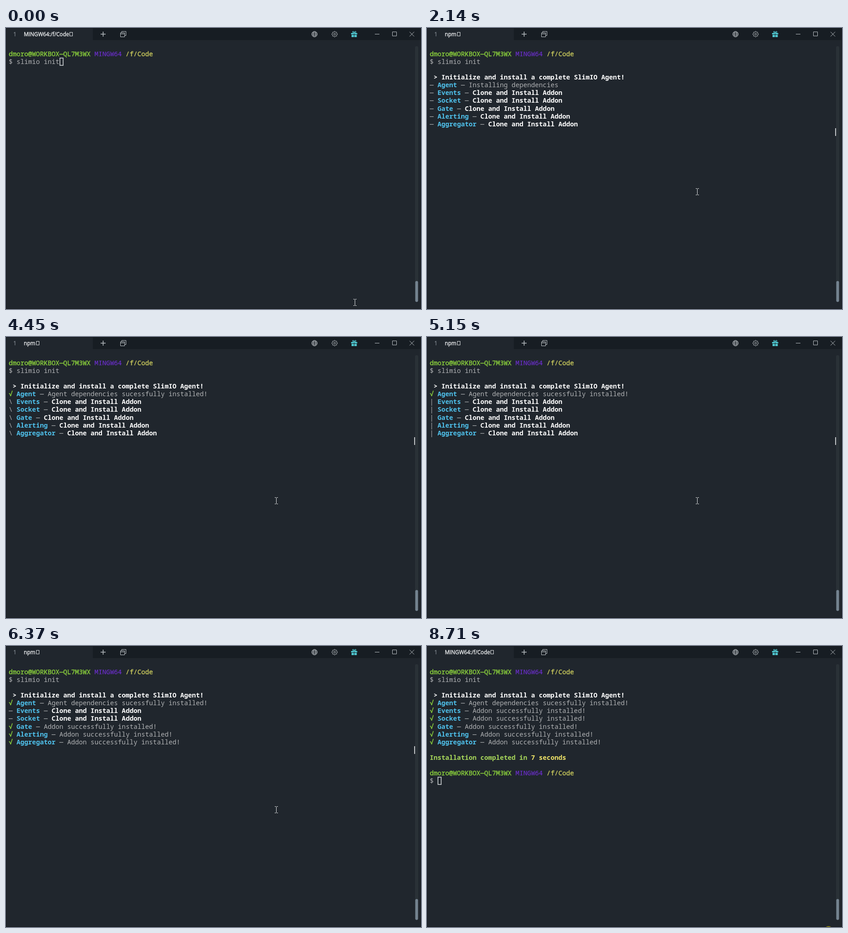
An HTML page for the animation above (8.86 s loop, 908 px wide and 617 px high).

```html
<!DOCTYPE html>
<html lang="en">
<head>
<meta charset="utf-8">
<title>Terminal</title>
<style>
  html, body { margin: 0; width: 100%; height: 100%; overflow: hidden; background: #20262d; }
  svg { display: block; width: 908px; height: 617px; }
  text { white-space: pre; }
  .ui { font: 11.7px "Open Sans", "Noto Sans", sans-serif; fill: #f2f4f5; stroke: #f2f4f5; stroke-width: .35; }
  .ui.index { fill: #7d858c; stroke: #7d858c; }
  #rows { font: 14.22px "Noto Sans Mono", "DejaVu Sans Mono", monospace; }
  .grey { fill: #b0b2b4; }
  .user { fill: #8bd13c; stroke: #8bd13c; stroke-width: .4; }
  .sys { fill: #6b2fcb; stroke: #6b2fcb; stroke-width: .2; }
  .path { fill: #c8c85c; stroke: #c8c85c; stroke-width: .4; }
  .white { fill: #fff; font-weight: 700; }
  .name { fill: #4fc1ec; font-weight: 700; }
  .ok { fill: #8bd13c; font-weight: 700; }
  .lime { fill: #a8d85a; font-weight: 700; }
  .gold { fill: #f0e468; font-weight: 700; }
  .icon { fill: none; stroke: #bcc1c5; stroke-width: 1; }
</style>
</head>
<body>
<svg viewBox="0 0 908 617">
  <rect width="908" height="617" fill="#20262d"/>
  <rect x="190" width="718" height="26.5" fill="#171d23"/>
  <rect x=".5" y=".5" width="907" height="616" fill="none" stroke="#12161a"/>

  <text class="ui index" x="16" y="18">1</text>
  <text class="ui" id="title" x="39" y="18"></text>
  <rect id="tofu" y="9.5" width="6" height="8" fill="none" stroke="#dfe2e4"/>

  <g class="icon">
    <path d="M207 13.5h11M212.5 8v11" stroke-width="1.5"/>
    <path d="M250.5 10.5h9v9h-9zM250.5 13h9M253 10.5v-3h9.5v9h-3"/>
    <circle cx="675" cy="13.5" r="6"/>
    <ellipse cx="675" cy="13.5" rx="2.8" ry="6"/>
    <path d="M669 13.5h12M670 10.5h10M670 16.5h10"/>
    <circle cx="719" cy="13.5" r="2"/>
    <path id="gear"/>
    <path d="M807 13.5h10M845.5 8.5h9v9h-9zM883 8.5l10 10M893 8.5l-10 10"/>
  </g>
  <g fill="#4fc6cf">
    <path d="M755 11h6.3v3h-6.3zM762.2 11h6.3v3h-6.3zM756 15h5.3v5h-5.3zM762.2 15h5.3v5h-5.3z"/>
    <path d="M762 11c-5-.5-4-4-2-3.500q1.500.5 2 3.500c.5-3 1-3.500 2-3.500 2-.5 3 3-2 3.500z" fill="none" stroke="#4fc6cf" stroke-width="1.2"/>
  </g>

  <rect x="895" y="40" width="7" height="561" rx="3" fill="#2a3137"/>
  <rect x="895.5" y="555.5" width="6" height="46" rx="3" fill="#748390"/>

  <g id="rows"></g>
  <rect id="block" width="7" height="16" stroke="#c3c7c9" stroke-width="1.7"/>
  <rect id="bar" x="893" width="2" height="17" fill="#c3c7c9"/>
  <circle id="click" r="9.5" fill="#f5e000" fill-opacity=".5"/>
  <path id="mouse" d="M-3.500-7h2.500l1 1 1-1h2.500M0-6v12M-3.500 7h2.500l1-1 1 1h2.500" fill="none" stroke="#e4e6e7"/>
</svg>
<script>
const LOOP = 8860, TICK = 77.04;
const LEFT = 5.9, CHAR_W = 8.532, ROW_H = 17.07;
const $ = id => document.getElementById(id);
const show = (el, on) => el.setAttribute('visibility', on ? 'visible' : 'hidden');
const place = (el, x, y) => el.setAttribute('transform', `translate(${x} ${y})`);
const rowMid = row => Math.round(40 + row * ROW_H);

$('gear').setAttribute('d', Array.from({ length: 33 }, (_, i) => {
  const a = (i - .5) * Math.PI / 16, r = i % 4 < 2 ? 6.2 : 4.7;
  return `${i ? 'L' : 'M'}${(719 + r * Math.cos(a)).toFixed(1)} ${(13.5 + r * Math.sin(a)).toFixed(1)}`;
}).join('') + 'z');

const lines = Array.from({ length: 16 }, (_, row) => {
  const el = document.createElementNS('http://www.w3.org/2000/svg', 'text');
  el.setAttribute('x', LEFT);
  el.setAttribute('y', rowMid(row) + 5);
  $('rows').append(el);
  return el;
});

// Each span is [class, text].
function setLine(row, spans) {
  const html = spans.map(([cls, text]) =>
    `<tspan class="${cls}">${text.replace(/>/g, '&gt;')}</tspan>`).join('');
  if (lines[row].shown !== html) lines[row].innerHTML = lines[row].shown = html;
}

const prompt = [['user', 'dmoro@WORKBOX—QL7M3WX '], ['sys', 'MINGW64 '], ['path', '/f/Code']];
const START = 980, FINISH = 8080, SUMMARY = 8150, RETURN = 8300, LEAVE = 8700;
const tasks = [
  { name: 'Agent', done: 2360 },
  { name: 'Events', done: FINISH },
  { name: 'Socket', done: 6440 },
  { name: 'Gate', done: 6060 },
  { name: 'Alerting', done: 6290 },
  { name: 'Aggregator', done: 6140 }
];

// The spinner runs slightly faster once the installs begin to finish.
function spinner(tick) {
  const since = tick - 75.8, pace = since < 0 ? 1.728 : 1.64;
  const step = Math.floor(since / pace);
  return { step, age: since - step * pace };
}

function taskLine({ name, done }, index, t, spin) {
  const agent = index === 0, finished = t >= done;
  const redrawing = index > 1 && spin.age > .15 && spin.age < .3;
  const mark = finished ? '√' : '—\\|/'[(spin.step - redrawing) & 3];
  const status = finished
    ? (agent ? 'Agent dependencies sucessfully installed!' : 'Addon successfully installed!')
    : (agent ? 'Installing dependencies' : 'Clone and Install Addon');
  return [
    [finished ? 'ok' : 'grey', mark + ' '], ['name', name], ['grey', ' — '],
    [finished || agent ? 'grey' : 'white', status]
  ];
}

function drawTitle(t) {
  const [text, tofuX] = t < 1130 || t >= RETURN ? ['MINGW64:/f/Code', 139.5]
    : t < 6590 ? ['npm', 66.5] : ['node-pre-gyp', 116.5];
  $('title').textContent = text;
  $('tofu').setAttribute('x', tofuX);
}

function drawCursor(t, spin) {
  const running = t >= START && t < SUMMARY;
  show($('block'), !running);
  show($('bar'), running);
  if (running) {
    const jumping = t < 5830 && spin.age > .85 && spin.age < 1;
    const row = jumping ? 0 : t < 6440 ? 11 : 7;
    $('bar').setAttribute('y', rowMid(row) - 8);
    return;
  }
  const [col, row] = t < 430 ? [13, 2] : t < START ? [0, 3] : t < RETURN ? [0, 13] : [2, 15];
  const focused = t >= 275 && t < LEAVE;
  $('block').setAttribute('x', Math.round(LEFT + col * CHAR_W) + 1);
  $('block').setAttribute('y', rowMid(row) - 8);
  $('block').setAttribute('fill', focused ? '#c3c7c9' : 'none');
}

function drawMouse(t) {
  const [x, y] = t < 65 ? [763.5, 602.5] : t < 125 ? [688.5, 496.5] : [591.5, 359.5];
  place($('mouse'), x, y);
  show($('mouse'), t < LEAVE);
  const leaving = t >= LEAVE;
  place($('click'), leaving ? 878.5 : 591, leaving ? 624.5 : 360);
  show($('click'), leaving || (t >= 275 && t < 355));
}

function draw(t) {
  const spin = spinner(Math.floor((t + 30) / TICK));
  const started = t >= START;
  setLine(1, prompt);
  setLine(2, [['grey', '$ slimio init']]);
  setLine(4, started ? [['white', ' > Initialize and install a complete SlimIO Agent!']] : []);
  tasks.forEach((task, i) => setLine(5 + i, started ? taskLine(task, i, t, spin) : []));
  setLine(12, t >= SUMMARY ? [['lime', 'Installation completed in '], ['gold', '7 seconds']] : []);
  setLine(14, t >= RETURN ? prompt : []);
  setLine(15, t >= RETURN ? [['grey', '$ ']] : []);
  drawTitle(t);
  drawCursor(t, spin);
  drawMouse(t);
}

const origin = performance.now();
function loop() {
  draw((performance.now() - origin) % LOOP);
  requestAnimationFrame(loop);
}
loop();
</script>
</body>
</html>
```
